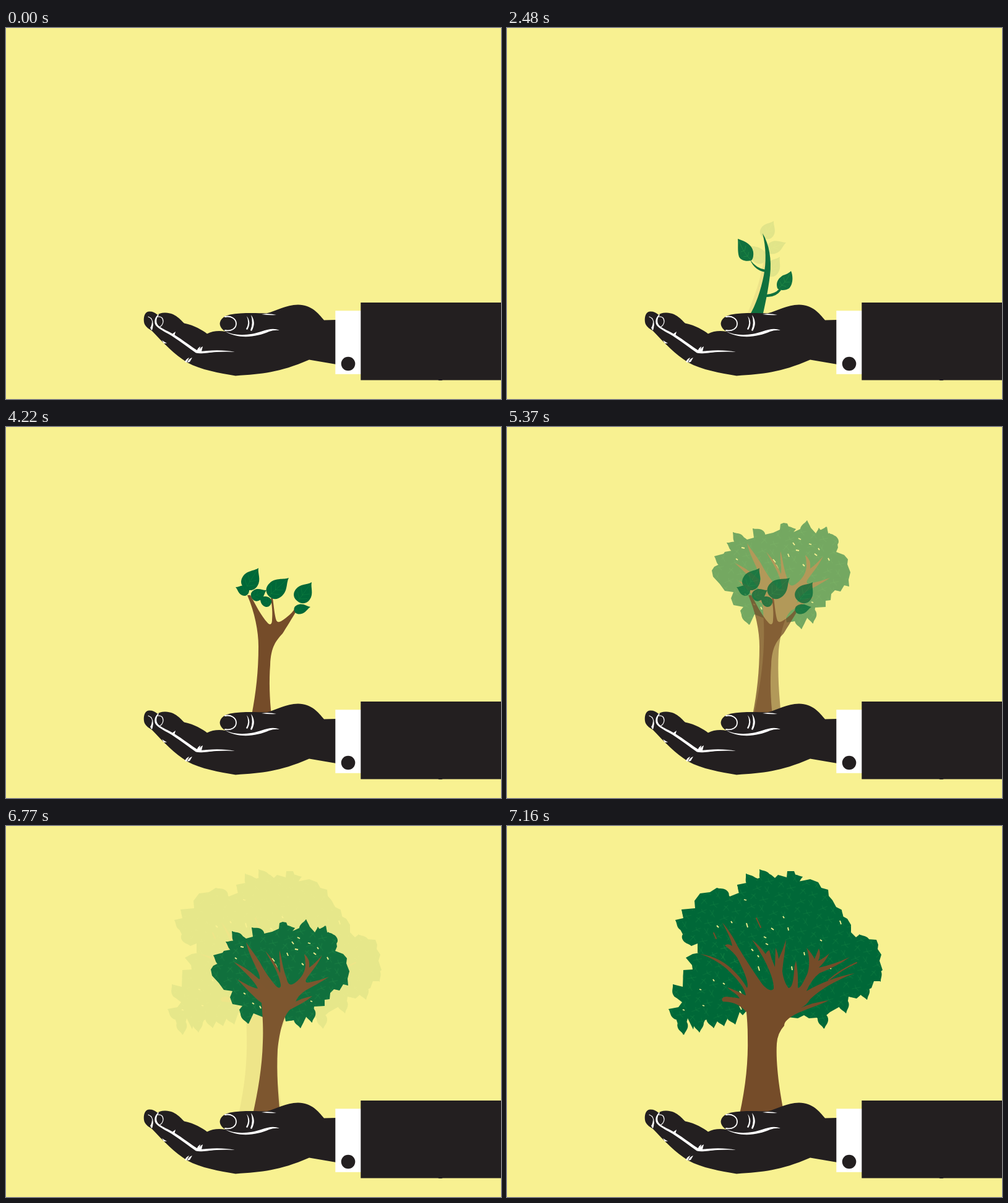
These frames come from a looping animation (800x600 px, 8000 ms). An HTML page without scripts:

```html
<!DOCTYPE html>
<html lang="en">
<head>
<meta charset="utf-8">
<title>Growing tree</title>
<style>
html,body{margin:0;width:100%;height:100%;overflow:hidden;background:#f8f191}
svg{display:block;width:800px;height:600px}
.stage{opacity:0;animation:8s step-end infinite}
.green{fill:#006838}
.bark{fill:#754c29}
.veins{fill:url(#veins)}
.twig{fill:none;stroke:#754c29;stroke-width:2;stroke-linecap:round}
.gaps{fill:none;stroke:#f8f191;stroke-width:1.8}
.rib{fill:none;stroke:#1f9447;stroke-width:.5}
.ink{fill:#231f20}
.line{fill:none;stroke:#fff;stroke-linecap:round;stroke-linejoin:round}
.white{fill:#fff}
#sprout{animation-name:sprout}
#sapling{animation-name:sapling}
#young{animation-name:young;stroke-opacity:.35}
#bushy{animation-name:bushy}
#grown{animation-name:grown}
/* fade in and out in 30 ms steps */
@keyframes sprout{
0%{opacity:0}
12.875%{opacity:.07;animation-timing-function:steps(4)}
14.375%{opacity:.53;animation-timing-function:steps(9)}
17.75%{opacity:1}
31%{opacity:.93;animation-timing-function:steps(4)}
32.5%{opacity:.75;animation-timing-function:steps(10)}
36.25%,to{opacity:0}}
@keyframes sapling{
0%{opacity:0}
31%{opacity:.09;animation-timing-function:steps(4)}
32.5%{opacity:.53;animation-timing-function:steps(10)}
36.25%{opacity:1}
47.875%{opacity:.92;animation-timing-function:steps(4)}
49.375%{opacity:.75;animation-timing-function:steps(9)}
52.75%,to{opacity:0}}
@keyframes young{
0%{opacity:0}
47.875%{opacity:.07;animation-timing-function:steps(4)}
49.375%{opacity:.53;animation-timing-function:steps(9)}
52.75%{opacity:1}
65.625%{opacity:.93;animation-timing-function:steps(4)}
67.125%{opacity:.75;animation-timing-function:steps(9)}
70.5%,to{opacity:0}}
@keyframes bushy{
0%{opacity:0}
65.625%{opacity:.07;animation-timing-function:steps(4)}
67.125%{opacity:.53;animation-timing-function:steps(9)}
70.5%{opacity:1}
84.625%{opacity:.93;animation-timing-function:steps(4)}
86.125%{opacity:.75;animation-timing-function:steps(9)}
89.5%,to{opacity:0}}
@keyframes grown{
0%{opacity:0}
84.625%{opacity:.07;animation-timing-function:steps(4)}
86.125%{opacity:.53;animation-timing-function:steps(9)}
89.5%,to{opacity:1}}
</style>
</head>
<body>
<svg viewBox="0 0 800 600">
<defs>
<!-- leaf with its tip at the origin, pointing up -->
<path id="leaf" class="green" d="M0 0C2 5 8.500 8 8.500 15.500C8.500 21 5 24 0 24C-5 24-8.500 21-8.500 15.500C-8.500 8-2 5 0 0Z"/>
<g id="ribbed">
<use href="#leaf"/>
<path class="rib" d="M0 3V23M-5 11L0 16L5 11M-6 16L0 21L6 16"/>
</g>
<pattern id="veins" width="37" height="31" patternUnits="userSpaceOnUse" patternTransform="rotate(17)">
<path class="rib" stroke-opacity=".65" d="M3 14L15 4M7 5L9 9L15 10M20 3L31 12M24 11L26 8V1M4 29L9 18M3 21L8 22L13 26M18 27L31 20M21 19L24 24L30 27"/>
</pattern>
<path id="cap" d="M272 152L285 149L282 135L304 133L303 121L312 109L328 107L339 100L357 110L360 114L375 108L372 95L387 92L386 77L405 85L411 83L408 70L427 79L433 84L438 79L452 83L453 73L464 73L467 81L478 82L470 90L490 86L503 91L508 100L519 103L520 113L526 120L532 131L540 135L539 144L550 150L556 160L556 172L564 180L569 176L583 183L597 184L600 192L599 199L605 208L602 218L607 233L602 237L604 251L593 251L589 262L585 264L582 281L573 272L565 279L552 276L548 303L538 292L522 301L515 307L512 328L501 310L488 311L480 306L470 311L445 308H390L387 240L308 205L308 190L298 194L284 175Z"/>
<path id="skirt" d="M387 299L381 306L376 301L369 321L359 306L351 323L344 308L334 327L328 311L320 314L311 334L304 315L301 329L292 311L285 338L276 320L272 308L261 296L277 293L283 285L270 275L268 256L284 260L285 233L300 232L299 225L289 213L300 207L317 204L350 190L400 240Z"/>
<path id="bush" d="M355 187L368 188L365 170L384 179L388 182L399 179L397 164L417 174L430 171L441 166L442 157L447 155L453 156L455 161L467 165L463 170L474 165L485 151L491 163L500 173L504 163L509 173L517 161L519 172L527 174L533 183L535 195L532 202L545 207L551 214L550 222L555 235L552 247L553 258L545 256L539 266L530 264L524 270L523 280L515 281L515 291L498 292L495 318L486 307L476 327L466 314L452 316L450 305L415 309L400 303L392 320L380 307L377 297L382 291L366 288L362 277L366 267L352 265L344 254L333 242L331 232L335 226L343 222L335 209L350 205L352 202L363 200Z"/>
</defs>

<g id="grown" class="stage">
<use href="#cap" class="green"/>
<use href="#skirt" class="green"/>
<use href="#leaf" transform="translate(272 152)rotate(-55)"/>
<use href="#leaf" transform="translate(282 135)rotate(-50)"/>
<use href="#leaf" transform="translate(339 100)rotate(-45)"/>
<use href="#leaf" transform="translate(372 95)rotate(-48)"/>
<use href="#leaf" transform="translate(386 77)rotate(-35)"/>
<use href="#leaf" transform="translate(408 70)rotate(-36)"/>
<use href="#leaf" transform="translate(478 82)rotate(70)"/>
<use href="#leaf" transform="translate(541 135)rotate(24)"/>
<use href="#leaf" transform="translate(569 175)rotate(-35)"/>
<use href="#leaf" transform="translate(604 252)rotate(152)"/>
<use href="#leaf" transform="translate(582 281)rotate(163)"/>
<use href="#leaf" transform="translate(548 303)rotate(165)"/>
<use href="#leaf" transform="translate(513 328)rotate(171)"/>
<use href="#leaf" transform="translate(369 321)rotate(158)"/>
<use href="#leaf" transform="translate(351 324)rotate(160)"/>
<use href="#leaf" transform="translate(334 327)rotate(168)"/>
<use href="#leaf" transform="translate(311 334)rotate(174)"/>
<use href="#leaf" transform="translate(286 338)rotate(172)"/>
<use href="#leaf" transform="translate(261 296)rotate(-58)"/>
<use href="#leaf" transform="translate(268 256)rotate(-32)"/>
<use href="#leaf" transform="translate(285 233)rotate(-35)"/>
<use href="#leaf" transform="translate(298 194)rotate(155)"/>
<use href="#cap" class="veins"/>
<use href="#skirt" class="veins"/>
<path class="gaps" d="M387 157l2 7M383 119l4 1M339 161l3 3M427 165l4 3M454 164l1 5M405 209l2 3M480 204l1 5M521 229l3 2M376 267l3 5M284 297l3 1M415 179l4 2M538 153l2 6M349 254l3 2M406 227l2 7M460 227l1 6M362 154l2 3M311 264l3 1M333 248l2 3M316 290l3 1M446 146l2 3M506 184l3 2M376 291l3 6M395 199l3 3M418 190l4 2"/>
<path class="bark" d="M376 466C386 420 390 380 389 340C389 325 388 312 387 301C375 287 362 284 349 284C345 280 349 276 354 276C362 277 368 277 376 279C372 271 363 268 356 261C366 264 378 270 386 274C385 262 370 245 355 231C342 220 328 212 312 207C335 210 355 221 370 238Q380 248 388 262C392 255 382 232 372 213C366 204 360 200 352 193Q357 189 364 194C362 182 355 170 348 156C358 168 366 180 373 195C385 215 400 238 412 255C420 265 428 268 431 263C432 250 422 228 414 213Q406 198 396 184Q408 193 418 207Q420 202 424 201Q427 215 433 228L434 197Q438 205 439 215Q446 200 451 184C450 200 446 220 445 235C446 245 450 256 455 262C462 262 463 245 464 235Q464 226 467 218Q471 235 470 262C475 262 480 250 485 240C489 230 490 212 484 197Q493 206 497 215L504 198Q508 207 503 218Q512 214 521 206Q514 220 504 229Q528 224 554 212Q535 226 505 238Q492 248 484 267Q520 246 562 238Q515 256 490 280Q484 290 475 294Q495 285 520 282C505 290 480 297 465 305C455 311 448 316 448 323Q437 335 436 352C434 385 441 432 448 466Z"/>
<path class="twig" d="M403 149L410 164M334 173L338 182M520 249Q540 232 565 221"/>
</g>

<g id="bushy" class="stage">
<use href="#bush" class="green"/>
<use href="#leaf" transform="translate(355 187)rotate(-62)"/>
<use href="#leaf" transform="translate(365 170)rotate(-40)"/>
<use href="#leaf" transform="translate(397 164)rotate(-48)"/>
<use href="#leaf" transform="translate(467 165)rotate(75)"/>
<use href="#leaf" transform="translate(485 151)rotate(10)"/>
<use href="#leaf" transform="translate(504 163)rotate(-8)"/>
<use href="#leaf" transform="translate(516 161)rotate(22)"/>
<use href="#leaf" transform="translate(520 171)rotate(-28)"/>
<use href="#leaf" transform="translate(335 209)rotate(-58)"/>
<use href="#leaf" transform="translate(539 266)rotate(158)"/>
<use href="#leaf" transform="translate(494 318)rotate(172)"/>
<use href="#leaf" transform="translate(476 327)rotate(170)"/>
<use href="#leaf" transform="translate(452 316)rotate(-135)"/>
<use href="#leaf" transform="translate(391 320)rotate(168)"/>
<use href="#bush" class="veins"/>
<path class="gaps" d="M379 195l5 1M462 187l3 4M471 180l4 2M497 205l4 3M503 196l2 3M430 214l4 5M454 205l2 5M384 270l3 2M478 222l3 3M435 223l3 6M467 199l5 1M519 212l2 4M398 286l3 2M370 213l3 2M488 189l4 1M410 291l2 4M492 283l3 1"/>
<path class="bark" d="M399 466C407 430 414 390 415 350C416 330 415 310 413 286C403 279 388 263 374 248C385 254 398 262 407 263C403 252 385 235 368 220C385 227 398 238 408 247C412 250 410 243 408 237C400 220 392 205 388 188C396 200 404 210 410 220C418 235 425 245 434 256C440 264 445 263 444 256C440 235 430 222 419 202C430 214 438 226 443 238C444 225 441 212 442 201C446 215 447 230 453 245C456 258 460 259 468 253C478 245 484 235 484 224Q484 215 482 207Q492 215 490 229Q500 222 511 209C505 222 495 234 487 245C482 252 485 254 490 253Q506 250 522 244C508 253 495 260 484 266Q472 274 468 284Q480 278 495 275C485 284 470 291 459 297C449 306 442 332 439 362C437 400 440 435 443 466Z"/>
</g>

<g id="young" class="stage">
<path class="bark" d="M397 466C404 430 408 395 408 355C408 330 402 300 390 272H395C402 285 412 305 423 317C427 321 430 319 430 312C431 300 430 290 428 277H431C433 290 434 305 437 313C440 318 445 314 452 309Q464 300 469 290L472 293C462 310 452 326 447 334C437 345 428 355 427 385C425 410 426 440 429 466Z"/>
<use href="#ribbed" transform="translate(408 228)rotate(32)scale(1.650)"/>
<use href="#ribbed" transform="translate(371 259)rotate(-68)scale(.96)"/>
<use href="#ribbed" transform="translate(421 264)rotate(63)scale(1.120)"/>
<use href="#ribbed" transform="translate(409 274)rotate(-54)scale(.95)"/>
<use href="#ribbed" transform="translate(457 244)rotate(48)scale(1.700,1.820)"/>
<use href="#ribbed" transform="translate(494 251)rotate(36)scale(1.650,1.600)"/>
<use href="#ribbed" transform="translate(492 291)rotate(78)scale(.92,1.120)"/>
</g>

<g id="sapling" class="stage">
<path fill="#8b5e3c" d="M415 336C420 350 422 365 421 378C420 400 414 440 410 466L387 465C398 440 409 410 413 385C417 368 418 352 414 338Z"/>
<use href="#ribbed" transform="translate(431 312)rotate(30)scale(1.380,1.320)"/>
<use href="#ribbed" transform="translate(451 347)rotate(68)scale(1.180,1.380)"/>
<use href="#ribbed" transform="translate(387 351)rotate(-48)scale(1.400,1.650)"/>
<use href="#ribbed" transform="translate(441 370)rotate(33)scale(1.380,1.500)"/>
</g>

<g id="sprout" class="stage">
<path class="green" d="M413 332C424 350 428 375 425 400C422 425 417 448 413 466L392 465C402 448 410 425 415 400C419 380 419 355 413 332Z"/>
<path class="green" d="M393 375Q403 389 418 391V395Q400 392 393 375ZM419 431Q433 430 440 422L443 424Q434 436 419 435Z"/>
<path class="green" d="M373 341C382 344 396 349 398 362Q399 372 395 376C386 378 378 376 375 370C372 360 374 350 373 341ZM459 393C463 402 462 415 456 421C450 425 440 425 437 421C434 412 438 405 446 400Q454 398 459 393Z"/>
<path class="rib" d="M375 345Q382 363 394 375M378 362L384 360L386 352M382 370L389 369L391 362M457 397Q452 410 440 420M447 403L449 411L457 411M441 410L444 416L451 418"/>
</g>

<g id="hand">
<path class="ink" d="M534 472L514 472.500C505 462 494 447.500 472 447.500C452 448 438 457 421 461.500C405 461 380 460 362 463.500C350 466 344 474 346 481C348 487 352 489 355 491Q338 488 325 494.500C318 489 305 481 288 477.500C282 472 274 461 258 460.500Q249 460 245 464C240 459 232 457 227 460C222 464 222 474 224 479C227 485 232 487 236 490C254 509 272 528 293 541C315 553 345 558 371 562.500C415 559 440 558 490 536.500L534 544Z"/>
<path class="white" d="M246 463C239 469 239 478 243 482C249 488 258 492 268 498C282 507 295 517 307 525.500C315 527.500 325 525 340 524Q358 523 370 524Q350 520 325 522Q317 523 311 522.500C300 516 285 504 272 496C262 490 253 487 247 482C242 478 242 470 247 464Z"/>
<path class="white" d="M268 497Q270 493 274 491L272 498ZM308 524Q309 518 314 515L312 524ZM312 523Q313 517 318 515L316 523ZM289 540Q291 535 296 533L292 541ZM293 541Q295 535 301 533L297 540ZM252 505L260 510L255 510Z"/>
<path class="line" stroke-width="1.200" d="M230 467Q238 470 237 480L235 488M245 467Q254 466 254 475Q253 482 247 484"/>
<path class="white" d="M236 474Q239 481 236 489L233 485Q236 481 236 474Z"/>
<path class="line" stroke-width="1.800" d="M354 467C363 465 372 470 372 478C372 486 364 491 354 489"/>
<path class="white" d="M353 490C370 499 395 497 412 491C424 487 433 485 442 489Q433 488 425 491C405 500 375 504 353 490ZM389 466Q397 476 390 488L388 487Q394 477 389 466ZM396 464Q405 476 397 490L395 489Q400 477 396 464ZM413 463Q425 461 437 464Q424 465 413 463Z"/>
<path class="white" d="M532.300 457.300H575V559.700H532.300Z"/>
<circle class="ink" cx="553" cy="543" r="11.300"/>
<path class="ink" d="M573.300 444H800V569.500H706Q702 570.500 698 569.500H573.300Z"/>
</g>
</svg>
</body>
</html>
```
